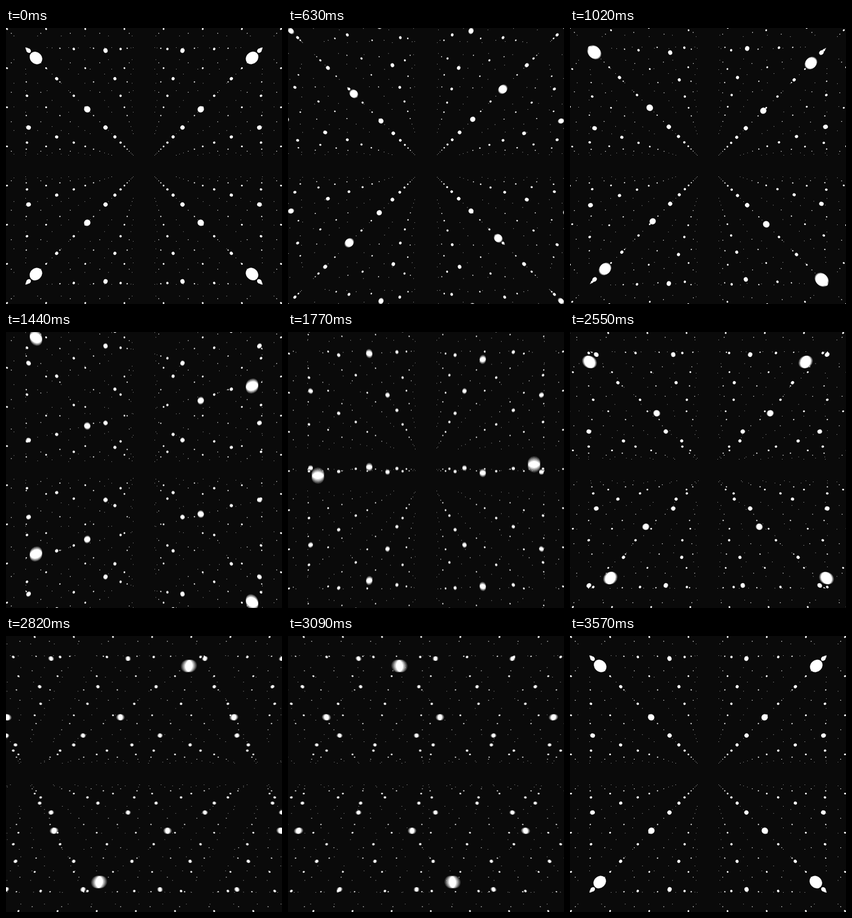
Recreate the animation shown at these times as an HTML page with a canvas. Size 500 by 500 pixels, loop 3600 ms.

```html
<!DOCTYPE html>
<html lang="en">
<head>
<meta charset="utf-8">
<title>Sliding lattice</title>
<style>
  html, body { margin: 0; width: 100%; height: 100%; overflow: hidden; background: #0a0a0a; }
  canvas { display: block; width: 100%; height: 100%; }
</style>
</head>
<body>
<canvas id="stage" width="500" height="500"></canvas>
<script>
const ctx = document.getElementById('stage').getContext('2d');

const SIZE = 500, MID = SIZE / 2;
const FOCAL = MID / Math.tan(Math.PI / 6);
const NEAREST = 0.106;          // camera to the closest layer, in cells
const NEAR = 0.25, FAR = 11.2;  // visible depth, in cells
const STEP = 30, STEPS = 120;   // ms per step, steps per loop
const SAMPLES = 8, SHUTTER = 0.7;

const ease = p => p * p * (3 - 2 * p);
const sign = n => (n % 2 === 0 ? -1 : 1);

// perspective size in pixels, thinning out to specks in the distance
const radius = z => Math.max(0.45, 10.6 / z + 1 - 0.2 * z);

function addBall(x, y, z) {
  if (z < NEAR || z > FAR) return;
  const scale = FOCAL / z, r = radius(z);
  const dx = x * scale, dy = y * scale;
  if (Math.abs(dx) > MID + 2 * r || Math.abs(dy) > MID + 2 * r) return;
  // a ball away from the axis stretches outwards
  const long = r * Math.hypot(dx, dy, FOCAL) / FOCAL;
  const turn = Math.atan2(dy, dx);
  ctx.moveTo(MID + dx + long * Math.cos(turn), MID + dy + long * Math.sin(turn));
  ctx.ellipse(MID + dx, MID + dy, long, r, turn, 0, 2 * Math.PI);
}

// The three axes take turns: rows slide one cell, neighbours in opposite directions.
function addLattice(t) {
  const part = (t % 1) * 3;
  const phase = Math.floor(part);
  const d = ease(part - phase);
  for (let k = 0; k <= 12; k++) {
    const reach = Math.ceil((k + 1.2) * MID / FOCAL) + 1;
    for (let i = -reach; i < reach; i++) {
      for (let j = -reach; j < reach; j++) {
        let x = i + 0.5, y = j + 0.5, z = k + NEAREST;
        if (phase === 0) z -= sign(i + j) * d;
        else if (phase === 1) y += sign(i + k) * d;
        else x += sign(j + k) * d;
        addBall(x, y, z);
      }
    }
  }
}

function draw(step) {
  ctx.globalCompositeOperation = 'source-over';
  ctx.fillStyle = '#0a0a0a';
  ctx.fillRect(0, 0, SIZE, SIZE);
  // motion blur: equal shares of light that add up to white
  ctx.globalCompositeOperation = 'lighter';
  ctx.fillStyle = 'rgb(31, 31, 31)';
  for (let s = 0; s < SAMPLES; s++) {
    ctx.beginPath();
    addLattice((step + s * SHUTTER / SAMPLES) / STEPS);
    ctx.fill();
  }
}

const start = performance.now();
let shown = -1;

function tick() {
  const step = Math.floor((performance.now() - start) / STEP) % STEPS;
  if (step !== shown) draw(shown = step);
  requestAnimationFrame(tick);
}
tick();
</script>
</body>
</html>
```
